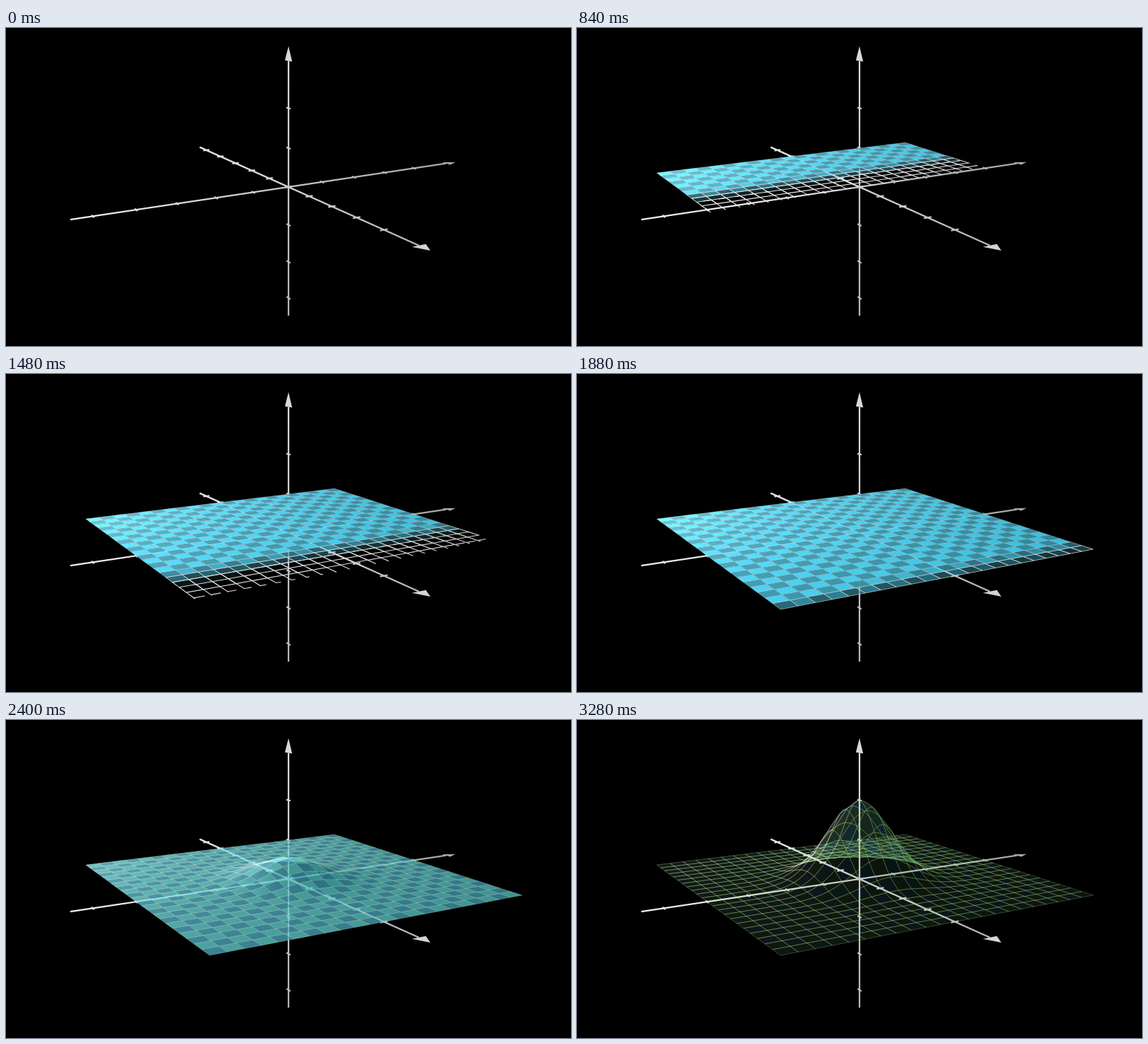
An HTML page with a canvas that plays this animation: 800 px wide and 450 px high, repeating every 4000 ms.

```html
<!DOCTYPE html>
<html lang="en">
<head>
<meta charset="utf-8">
<title>Gaussian surface</title>
<style>
  html, body { margin: 0; width: 100%; height: 100%; overflow: hidden; background: #000; }
  canvas { display: block; width: 800px; height: 450px; }
</style>
</head>
<body>
<canvas id="stage" width="800" height="450"></canvas>
<script>
const ctx = document.getElementById('stage').getContext('2d');
const LOOP = 4000, STEP = 40, FPS = 30, DRAW_MS = 2000, MORPH_MS = 1000;
const UNIT = 56.25, FOCAL = 20;
const N = 22, SIZE = 4, CELL = 2 * SIZE / N;
const LAG = 4 / (N * N);
const LIGHT = [-7, -9, 10];
const rad = deg => deg * Math.PI / 180;
const SIN_T = Math.sin(rad(60)), COS_T = Math.cos(rad(60));
const SIN_P = Math.sin(rad(75)), COS_P = Math.cos(rad(75));

const hex = s => [1, 3, 5].map(i => parseInt(s.slice(i, i + 2), 16) / 255);
const FLAT = { fills: [hex('#29ABCA'), hex('#1C758A')], stroke: hex('#BBBBBB'), alpha: 1 };
const BELL = { fills: [hex('#83C167'), hex('#58C4DD')], stroke: hex('#83C167'), alpha: 0.1 };

const clamp = x => Math.min(1, Math.max(0, x));
const lerp = (a, b, k) => a + (b - a) * k;
const mix = (a, b, k) => a.map((v, i) => lerp(v, b[i], k));
const sub = (a, b) => a.map((v, i) => v - b[i]);
const dot = (a, b) => a[0] * b[0] + a[1] * b[1] + a[2] * b[2];
const cross = (a, b) => [
  a[1] * b[2] - a[2] * b[1], a[2] * b[0] - a[0] * b[2], a[0] * b[1] - a[1] * b[0]];
const unit = a => { const l = Math.hypot(...a) || 1; return a.map(v => v / l); };
const sigmoid = x => 1 / (1 + Math.exp(-x));
const smooth = t => {
  const e = sigmoid(-5);
  return clamp((sigmoid(10 * (t - 0.5)) - e) / (1 - 2 * e));
};

// Camera: 75 degrees from the vertical, turned by -30 degrees
const depth = ([x, y, z]) => (SIN_T * x - COS_T * y) * SIN_P + z * COS_P;
function project(p) {
  const [x, y, z] = p;
  const k = UNIT * FOCAL / (FOCAL - depth(p));
  const side = COS_T * x + SIN_T * y;
  const up = (COS_T * y - SIN_T * x) * COS_P + z * SIN_P;
  return [400 + side * k, 225 - up * k];
}

function shade(rgb, point, normal) {
  let f = 0.5 * dot(unit(normal), unit(sub(LIGHT, point))) ** 3;
  if (f < 0) f *= 0.5;
  return rgb.map(c => clamp(c + f));
}
const css = (rgb, a = 1) => `rgba(${rgb.map(c => Math.round(c * 255))},${a})`;

function gradient(from, to, c0, c1) {
  const g = ctx.createLinearGradient(...from, ...to);
  g.addColorStop(0, c0);
  g.addColorStop(1, c1);
  return g;
}

function polyline(points) {
  ctx.beginPath();
  points.forEach(p => ctx.lineTo(...project(p)));
}

// Each axis: its direction, the direction of its ticks, its reach and its greys
const AXES = [
  { dir: [1, 0, 0], tick: [0, 1, 0], end: 5.5, low: 228, high: 182, tip: 212 },
  { dir: [0, 1, 0], tick: [1, 0, 0], end: 5.5, low: 240, high: 165, tip: 168 },
  { dir: [0, 0, 1], tick: [1, 0, 0], end: 3.5, low: 182, high: 224, tip: 216 }
];
const TIP = 0.35;

function drawAxis({ dir, tick, end, low, high, tip }) {
  const at = (s, w = 0) => dir.map((d, i) => d * s + tick[i] * w);
  const grey = v => `rgb(${v},${v},${v})`;
  ctx.strokeStyle = gradient(project(at(-end)), project(at(end)), grey(low), grey(high));
  ctx.lineWidth = 2.25;
  polyline([at(-end), at(end - TIP)]);
  ctx.stroke();
  for (let s = Math.ceil(-end); s < end - 0.5; s++) {
    polyline([at(s, -0.1), at(s, 0.1)]);
    ctx.stroke();
  }
  ctx.fillStyle = grey(tip);
  polyline([at(end), at(end - TIP, TIP / 2), at(end - TIP, -TIP / 2)]);
  ctx.fill();
}

// Twelve control points of a cell: four cubic edges, a third apart
function cellPoints(u, v, height) {
  const corners = [[0, 0], [1, 0], [1, 1], [0, 1]];
  const pts = [];
  corners.forEach((c, i) => {
    const next = corners[(i + 1) % 4];
    for (let k = 0; k < 3; k++) {
      const [a, b] = mix(c, next, k / 3);
      const x = u + a * CELL, y = v + b * CELL;
      pts.push([x, y, height * 2 * Math.exp(-(x * x + y * y) / 1.28)]);
    }
  });
  return pts;
}

function partialEdges(flat, part) {
  ctx.beginPath();
  ctx.moveTo(...flat[0]);
  const done = part * 4;
  for (let e = 0; e < done; e++) {
    ctx.lineTo(...mix(flat[e * 3], flat[(e * 3 + 3) % 12], clamp(done - e)));
  }
}

function closedCell(flat) {
  ctx.beginPath();
  ctx.moveTo(...flat[0]);
  for (let i = 1; i < 12; i += 3) {
    ctx.bezierCurveTo(...flat[i], ...flat[i + 1], ...flat[(i + 2) % 12]);
  }
  ctx.closePath();
}

function drawCell({ pts, odd, grow }, look) {
  const flat = pts.map(project);
  const outline = clamp(grow * 2), filled = clamp(grow * 2 - 1);
  // Light is sampled at the first corner and near the opposite one
  const n0 = cross(sub(pts[3], pts[0]), sub(pts[9], pts[0]));
  const n1 = cross(sub(pts[7], pts[5]), sub(pts[3], pts[5]));
  const paint = (rgb, a) => gradient(flat[0], flat[5],
    css(shade(rgb, pts[0], n0), a), css(shade(rgb, pts[5], n1), a));

  if (outline < 1) partialEdges(flat, outline);
  else closedCell(flat);
  if (filled > 0) {
    ctx.fillStyle = paint(look.fills[odd], look.alpha * filled);
    ctx.fill();
  }
  ctx.strokeStyle = paint(look.stroke, 1);
  ctx.lineWidth = lerp(2, 0.5, filled) * UNIT / 100;
  ctx.stroke();
}

function drawSurface(t) {
  const reach = clamp(t / DRAW_MS) * (1 + (N * N - 1) * LAG);
  const k = smooth(clamp((t - DRAW_MS) / MORPH_MS));
  const look = {
    fills: FLAT.fills.map((c, i) => mix(c, BELL.fills[i], k)),
    stroke: mix(FLAT.stroke, BELL.stroke, k),
    alpha: lerp(FLAT.alpha, BELL.alpha, k)
  };
  const cells = [];
  for (let i = 0; i < N * N; i++) {
    const grow = clamp(reach - i * LAG);
    if (grow <= 0) break;
    const row = Math.floor(i / N), col = i % N;
    const pts = cellPoints(-SIZE + row * CELL, -SIZE + col * CELL, k);
    const far = (depth(pts[0]) + depth(pts[3]) + depth(pts[6]) + depth(pts[9])) / 4;
    cells.push({ pts, far, grow, odd: (row + col) % 2 });
  }
  cells.sort((a, b) => a.far - b.far);
  cells.forEach(c => drawCell(c, look));
}

// The scene advances at 30 frames a second and is shown every 40 ms
let shown = -1;
function tick() {
  const step = Math.floor((performance.now() % LOOP) / STEP);
  if (step !== shown) {
    shown = step;
    ctx.fillStyle = '#000';
    ctx.fillRect(0, 0, 800, 450);
    AXES.forEach(drawAxis);
    drawSurface(Math.round(step * STEP * FPS / 1000) * 1000 / FPS);
  }
  requestAnimationFrame(tick);
}
tick();
</script>
</body>
</html>
```
